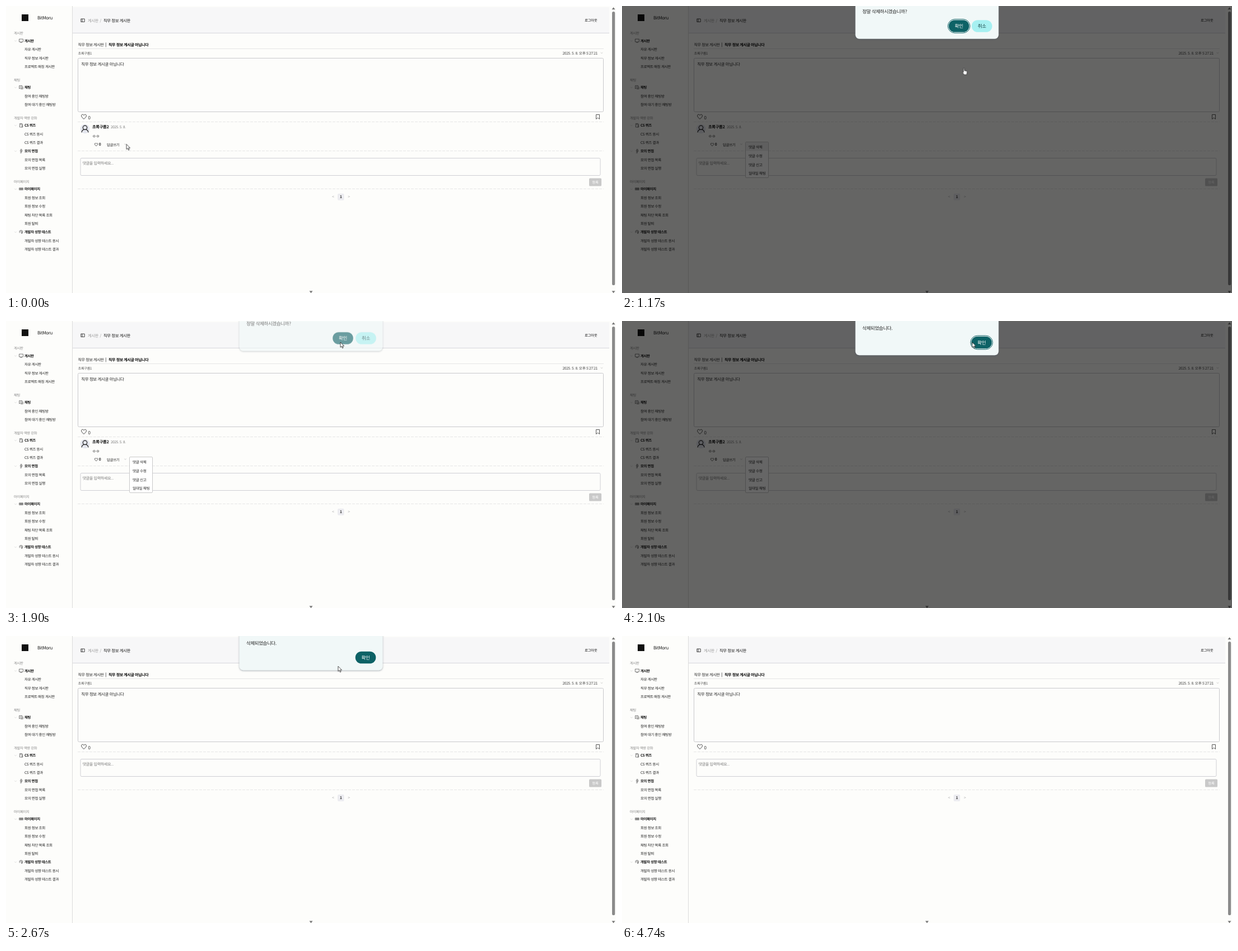
Animation of 1089 by 514 pixels, one loop 4780 ms. Source, as an HTML page:

```html
<!DOCTYPE html>
<html lang="ko">
<head>
<meta charset="utf-8">
<title>게시판</title>
<style>
html, body { margin: 0; width: 100%; height: 100%; overflow: hidden; background: #fdfdfb; }
svg { display: block; width: 1089px; height: 514px; }
text { font-family: "Noto Sans CJK KR", "Noto Sans CJK", sans-serif; letter-spacing: -.05em; white-space: pre; text-rendering: geometricPrecision; }
</style>
</head>
<body>
<svg id="stage" viewBox="0 0 1089 514" xmlns="http://www.w3.org/2000/svg"></svg>
<script>
const LOOP = 4780;
const PAGE = '#fdfdfb';

// y is the vertical middle of the line of text
const label = (x, y, str, size = 6.5, fill = '#222', weight = 400, anchor = 'start') =>
  `<text x="${x}" y="${y + size * .37}" font-size="${size}" fill="${fill}" font-weight="${weight}" text-anchor="${anchor}">${str}</text>`;
const box = (x, y, w, h, fill, stroke = 'none', r = 0) =>
  `<rect x="${x}" y="${y}" width="${w}" height="${h}" rx="${r}" fill="${fill}" stroke="${stroke}"/>`;
const line = (d, stroke = '#333', width = .9, extra = '') =>
  `<path d="${d}" fill="none" stroke="${stroke}" stroke-width="${width}" ${extra}/>`;
const rule = (x, y, w, dash = '') => line(`M${x} ${y}h${w}`, '#e6e6e6', 1, `stroke-dasharray="${dash}"`);
const chevron = (x, y, color = '#aaa') => line(`M${x - 1.8} ${y - .8}l1.8 1.6l1.8-1.6`, color, .6);
const heart = (x, y, s, width) =>
  `<path transform="translate(${x} ${y}) scale(${s})" d="M0 4.4C-2.2 2.6-4.4 .8-4.4-1.4C-4.4-4.2-1.2-4.6 0-2.2C1.2-4.6 4.4-4.2 4.4-1.4C4.4 .8 2.2 2.6 0 4.4Z" fill="none" stroke="#333" stroke-width="${width}"/>`;

const icons = {
  screen: 'M-3.5-3h7v5h-7zM-1.5 3.2h3',
  chat: 'M-3.3-3h5v4.2h-3.4l-1.6 1.3zM-1 2.8h4.3v-4M-1.8-1h2',
  door: 'M-2.6-3h4.4v6.2h-4.4zM2.8-2v5.2h-2M-.5-3v3',
  mic: 'M-.8-3h2v3h-2zM-2.3-.2q2.5 2.6 5 0M.2 1.4v1.8M-2 3.2h3',
  keys: 'M-3.4-1.9h6.8v3.6h-6.8zM-3-.2h6M-1.4-1.6v3M.2-1.6v3M1.8-1.6v3',
  test: 'M-2.8-1.8q2.7-2.6 5.4 0v3.4l-1.5 1.6M-2.8-1.8v3.4M-1.2-1.4q1.6-.8 2.2 .8l.4 2.4M-.6 0l2 3.2',
};

const menu = [
  ['게시판', 49, [['screen', '게시판', 62.5, ['자유 게시판', '직무 정보 게시판', '프로젝트 매칭 게시판']]]],
  ['채팅', 132.5, [['chat', '채팅', 146, ['참여 중인 채팅방', '참여 대기 중인 채팅방']]]],
  ['개발자 역량 강화', 200.5, [
    ['door', 'CS 퀴즈', 214, ['CS 퀴즈 응시', 'CS 퀴즈 결과']],
    ['mic', '모의 면접', 260, ['모의 면접 목록', '모의 면접 실행']]]],
  ['마이페이지', 314.5, [
    ['keys', '마이페이지', 328, ['회원 정보 조회', '회원 정보 수정', '채팅 차단 목록 조회', '회원 탈퇴']],
    ['test', '개발자 성향 테스트', 405, ['개발자 성향 테스트 응시', '개발자 성향 테스트 결과']]]],
];

const group = ([icon, title, y, items]) =>
  chevron(17, y, '#ccc') +
  `<g transform="translate(27 ${y - .3})">${line(icons[icon], '#444', .7)}</g>` +
  label(33, y, title, 6.4, '#111', 600) +
  items.map((item, i) => label(33, y + 15.4 * (i + 1), item)).join('');

const sidebar = () =>
  line('M118.5 0V514', '#dcdcdc', 1) + box(28, 15, 12, 12, '#111') + label(56, 21.5, 'BitMoru', 8) +
  menu.map(([head, y, groups]) => label(14, y, head, 6.3, '#888') + groups.map(group).join('')).join('');

const header = () =>
  box(119, 2, 958, 47, '#f7f7f8') + line('M119 48.5H1077', '#d6d6dc', 1) +
  line('M133.8 23h6.4v5.4h-6.4zM136 23v5.4', '#333', .9) +
  label(146, 26, '게시판', 7.2, '#999') + label(167.5, 26, '/', 7, '#999') +
  label(174, 26, '직무 정보 게시판', 7.3, '#111', 500) +
  label(1033, 26, '로그아웃', 6.4, '#111', 500);

const post = () =>
  label(128.5, 69.3, '직무 정보 게시판', 7, '#222', 500) + line('M178.3 65.5v8', '#555', .8) +
  label(183, 69.3, '직무 정보 게시글 아닙니다', 6.95, '#000', 600) + rule(128, 76.5, 939) +
  label(128.5, 84.5, '초록구름1', 6.2, '#555') +
  label(1056, 84.5, '2025. 5. 8. 오후 5:27:21', 6.7, '#444', 400, 'end') + chevron(1063.5, 84) +
  box(128.5, 93.5, 938, 96, PAGE, '#c8c8cc', 2) +
  label(134.3, 104.3, '직무 정보 게시글 아닙니다', 7.43) +
  heart(139, 198, 1, .9) + label(146.5, 200, '0', 8, '#333') +
  line('M1053.5 194.5h6v8l-3-2.3l-3 2.3z', '#444', .9) + rule(128, 207.5, 939, '5 2');

const comment = () =>
  `<circle cx="141" cy="220" r="8.3" fill="#e4e6ee"/><circle cx="141" cy="217.8" r="3.7" fill="none" stroke="#222" stroke-width="1.2"/>` +
  line('M135 226.5q.6-4.5 4-5.2h4q3.4 .7 4 5.2', '#222', 1.2) +
  label(154, 216.7, '초록구름2', 7.3, '#111', 600) + label(187, 216.7, '2025. 5. 8.', 6.4, '#777') +
  label(154, 233, 'ㅇㅇ', 7.4) + heart(161, 248, .62, 1.2) + label(165.8, 248, '0', 6.6, '#222', 700) +
  label(180, 248.3, '답글쓰기', 6.45, '#222', 500) + chevron(213, 247.5) + rule(128, 259.5, 939, '5 2');

const reply = () =>
  box(133, 272.5, 928, 31, PAGE, '#cfcfd4', 2) + label(136.7, 281.3, '댓글을 입력하세요...', 7, '#777') +
  box(1041, 308.5, 22, 14, '#c9c9c9', 'none', 1.5) + label(1052, 315.6, '등록', 6.4, '#fff', 500, 'middle') +
  rule(128, 327.5, 939, '5 2') + box(592, 336, 11.5, 12, '#ececf0', 'none', 2) +
  label(597.8, 341.8, '1', 6.5, '#222', 700, 'middle') +
  label(583.7, 341.8, '&lt;', 7, '#aaa', 400, 'middle') + label(612, 341.8, '&gt;', 7, '#aaa', 400, 'middle');

const dropdown = () =>
  box(220.5, 243.5, 41, 64, '#fff', '#c9c9c9', 1.5) +
  `<g id="hover">${box(221, 244, 40, 15.5, '#eee')}</g>` +
  ['댓글 삭제', '댓글 수정', '댓글 신고', '일대일 채팅']
    .map((s, i) => label(226, 252.3 + 15.9 * i, s, 6.65, '#222', 500)).join('');

const scrollbar = () =>
  box(1082, 10, 5.2, 490, '#8b8b8b', 'none', 2.6) +
  '<path d="M1081.5 6.2l3-4l3 4zM1081.5 510.3h6l-3 4zM541.5 510.3h6l-3 4z" fill="#777"/>';

const button = (cx, cy, str, fill, ink) =>
  box(cx - 18.3, cy - 10.8, 36.6, 21.6, fill, 'none', 10.8) + label(cx, cy, str, 8.5, ink, 400, 'middle');

function dialog(id, bottom, str, okX, cancelX) {
  const cy = bottom - 22.8;
  return `<g id="${id}"><g filter="url(#shadow)">${box(416.7, -60, 255.6, bottom + 60, '#f1f8f8', 'none', 7)}</g>` +
    label(429, bottom - 48.6, str, 8.5, '#222') +
    `<g id="${id}Ring">${box(okX - 19.8, cy - 12.3, 39.6, 24.6, '#fff', '#0d6064', 12.3)}</g>` +
    button(okX, cy, '확인', '#0d6266', '#fff') +
    (cancelX ? button(cancelX, cy, '취소', '#a6f0f1', '#123c3e') : '') + '</g>';
}

const pointer = () =>
  `<g id="cursor"><path id="arrow" d="M0 0v9.2l2.1-1.9l1.5 3.4l1.5-.7l-1.5-3.2h3z" fill="#fff" stroke="#222" stroke-width=".8"/>
  <path id="hand" d="M-.9 .8q.9-1.5 1.8 0v4l3.9 1q1.2 .4 .9 1.8l-.7 4.6h-4.6l-3-4q-.3-1.4 1.7-.2z" fill="#fff" stroke="#222" stroke-width=".8"/></g>`;

document.getElementById('stage').innerHTML =
  '<defs><filter id="shadow" x="-10%" y="-10%" width="120%" height="125%"><feDropShadow dx="0" dy="1" stdDeviation="1.6" flood-color="#456" flood-opacity=".5"/></filter></defs>' +
  box(0, 0, 1089, 514, PAGE) + header() + sidebar() + post() +
  `<g id="comment">${comment()}</g><g id="reply">${reply()}</g><g id="dropdown">${dropdown()}</g>` +
  scrollbar() + `<g id="shade">${box(0, 0, 1089, 514, '#000')}</g>` +
  dialog('ask', 58.8, '정말 삭제하시겠습니까?', 601.5, 642.5) +
  dialog('done', 61.3, '삭제되었습니다.', 642) + pointer();

// steps: [time, value, easing towards the next step]
function track(id, prop, steps, fallback = 'linear') {
  const all = [...steps, [LOOP, steps[steps.length - 1][1]]];
  document.getElementById(id).animate(
    all.map(([ms, value, easing = fallback]) => ({ offset: ms / LOOP, [prop]: value, easing })),
    { duration: LOOP, iterations: Infinity });
}
const HARD = 'steps(1, end)';
const at = (x, y) => `translate(${x}px, ${y}px)`;
const show = (id, from, to) => track(id, 'opacity', [[0, 0], [from, 1], [to, 0]], HARD);

// The page is frozen while a dialog is open and repaints as soon as it closes.
const ASK = { open: 700, close: 1860 };
const DONE = { open: 1995, close: 2655 };
const FADE = 100, LIFT = -13;

track('shade', 'opacity', [[0, 0], [ASK.open, .6], [ASK.close, 0], [DONE.open, .6], [DONE.close, 0]], HARD);
for (const [id, { open, close }] of Object.entries({ ask: ASK, done: DONE })) {
  const fade = (away, rest) =>
    [[0, away], [open, away], [open + FADE, rest], [close, rest, HARD], [close + 17, rest], [close + 17 + FADE * .6, away]];
  track(id, 'opacity', fade(0, 1));
  track(id, 'transform', fade(at(0, LIFT), at(0, 0)));
  show(id + 'Ring', open, close);
}

show('dropdown', 330, DONE.close);
show('hover', 500, ASK.close);
track('comment', 'opacity', [[0, 1], [DONE.close, 0]], HARD);
track('reply', 'transform', [[0, at(0, 0)], [DONE.close, at(0, -52)]], HARD);

track('cursor', 'transform', [
  [0, at(215, 247.5)], [330, at(215, 247.5)], [530, at(236, 251)],
  [840, at(236, 251), 'ease-in'], [1170, at(610.5, 111.5), 'ease-out'], [1340, at(598, 38)],
  [1900, at(597, 38), 'ease-in'], [2100, at(625, 38), 'ease-out'], [2240, at(637, 39)],
  [2540, at(637, 39), 'ease-in'], [2670, at(593, 54), 'ease-out'], [2800, at(580, 60)],
  [3000, at(600, -16)]], 'ease-in-out');
track('arrow', 'opacity', [[0, 1], [500, 0], [1250, 1]], HARD);
show('hand', 500, 1250);
</script>
</body>
</html>
```
